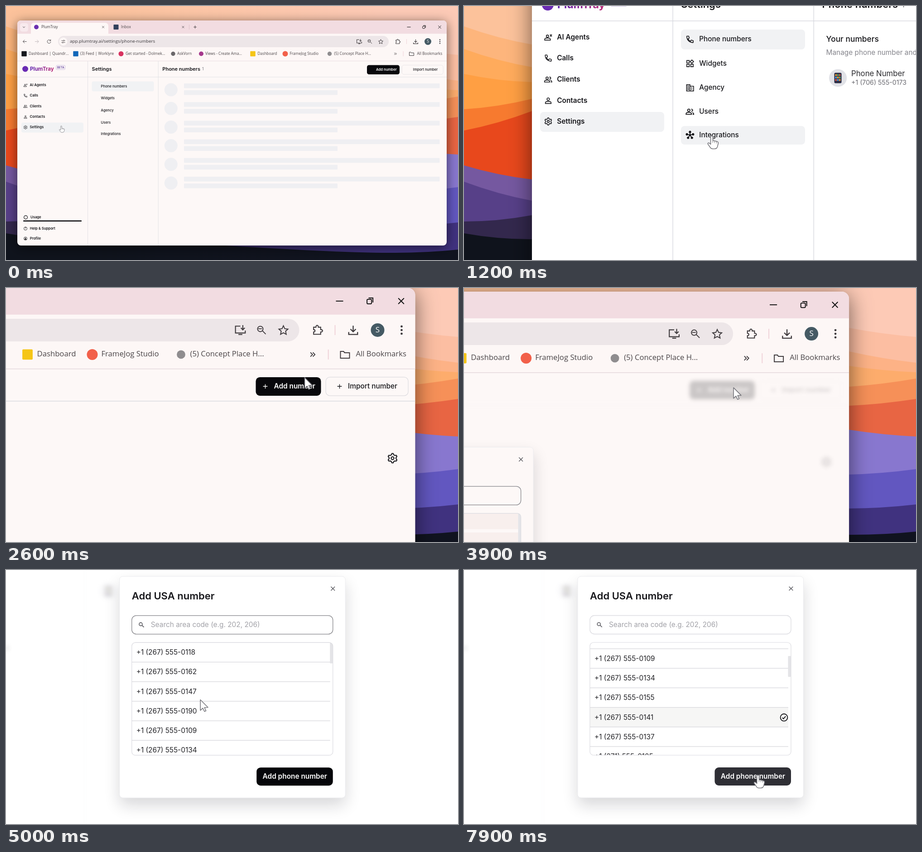
An HTML page with a canvas for the animation above (8000 ms loop, 998 px wide and 561 px high).

```html
<!DOCTYPE html>
<html lang="en">
<head>
<meta charset="utf-8">
<title>Phone number setup</title>
<style>
html, body { margin: 0; width: 100%; height: 100%; overflow: hidden; background: #10131f; }
canvas { display: block; width: 100vw; height: 100vh; }
</style>
</head>
<body>
<canvas id="stage" width="998" height="561"></canvas>
<script>
const W = 998, H = 561, LOOP = 8000;
const stage = document.getElementById('stage').getContext('2d');
const layer = document.createElement('canvas');
layer.width = W; layer.height = H;
const pageCtx = layer.getContext('2d');
let c = stage;

const UI = 'Inter, sans-serif', CHROME = '"Open Sans", sans-serif';
const INK = '#17171b', LINE = '#d8d9df';
const clamp = v => Math.max(0, Math.min(1, v));
const lerp = (a, b, k) => a + (b - a) * k;
const ramp = (t, a, b) => clamp((t - a) / (b - a));
const smooth = u => u * u * (3 - 2 * u);
const quart = u => u < .5 ? 8 * u ** 4 : 1 - 8 * (1 - u) ** 4;

// --- drawing helpers ---
function text(s, x, y, size, color = INK, weight = 400, font = UI, align = 'left') {
  c.font = `${weight} ${size}px ${font}`;
  c.textAlign = align;
  c.textBaseline = 'middle';
  c.fillStyle = color;
  c.fillText(s, x, y);
}
function box(x, y, w, h, r, fill, stroke, lw = .5) {
  c.beginPath();
  c.roundRect(x, y, w, h, r);
  if (fill) { c.fillStyle = fill; c.fill(); }
  if (stroke) { c.strokeStyle = stroke; c.lineWidth = lw; c.stroke(); }
}
function dot(x, y, r, fill) {
  c.beginPath();
  c.arc(x, y, r, 0, 7);
  c.fillStyle = fill;
  c.fill();
}
function icon(d, x, y, size, color = INK, lw = 2, fill = false) {
  c.save();
  c.translate(x - size / 2, y - size / 2);
  c.scale(size / 24, size / 24);
  c.lineWidth = lw;
  c.strokeStyle = c.fillStyle = color;
  const p = new Path2D(d);
  if (fill) c.fill(p);
  c.stroke(p);
  c.restore();
}
const rule = (x, y, w, h, color) => { c.fillStyle = color; c.fillRect(x, y, w, h); };

function gearPath() {
  let d = '';
  for (let i = 0; i < 24; i++) {
    const r = i % 4 < 2 ? 10 : 7.4, a = (i - .5) * Math.PI / 12;
    d += (i ? 'L' : 'M') + (12 + r * Math.sin(a)) + ' ' + (12 - r * Math.cos(a));
  }
  return d + 'ZM15 12a3 3 0 1 1-6 0a3 3 0 1 1 6 0';
}
const I = {
  person: 'M15.500 8a3.500 3.500 0 1 1-7 0a3.500 3.500 0 1 1 7 0M4 20v-2q0-4 8-4t8 4v2z',
  agent: 'M13 9a3.200 3.200 0 1 1-6.400 0a3.200 3.200 0 1 1 6.400 0M2 20v-2q0-4 8-4t8 4v2zM17 4l5 6M22 4l-5 6',
  people: 'M12 8a3.200 3.200 0 1 1-6.400 0a3.200 3.200 0 1 1 6.400 0M1.500 19v-1.500q0-4 7.300-4t7.300 4V19zM15 5q4 0 4 3t-4 3M18 14q4 1 4 5h-3',
  phone: 'M4 3.500h4.500l1.500 5-3 2.500q2 4 6 6l2.500-3 5 1.500V20q0 .7-.7.7Q4 19 3.500 4z',
  gear: gearPath(),
  widgets: 'M3.500 4h6.500v6.500H3.500zM3.500 14h6.500v6.500H3.500zM14 14h6.500v6.500H14zM17 2.500l4.500 4.500-4.500 4.500-4.500-4.500z',
  building: 'M3 4h9v16.500H3zM12 8h9.500v12.500H12M5 8h5M5 12h5M5 16h5M15 12h3M15 16h3',
  hub: 'M12 12V4M12 12l8-2M12 12l5 7M12 12l-5 7M12 12l-8-2',
  ring: 'M20.500 12a8.500 8.500 0 1 1-17 0a8.500 8.500 0 1 1 17 0',
  plus: 'M12 3v18M3 12h18',
  close: 'M4 4l16 16M20 4L4 20',
  search: 'M15 9.500a6 6 0 1 1-12 0a6 6 0 1 1 12 0M14 14l7 7',
  star: 'M12 2.500l3 6.500 7 .8-5.200 4.700 1.500 7L12 18l-6.300 3.500 1.500-7L2 9.800l7-.8z',
  down: 'M12 3v12M6.500 10l5.500 5.500 5.500-5.500M3 16v5h18v-5',
  install: 'M12 4H2v14h20v-5M8 21h8M17 2v9M13 7.500l4 4 4-4',
  puzzle: 'M4 6h5q0-4 2.500-4T14 6h5v5q4 0 4 2.500T19 16v5H4v-5q3 0 3-2.500T4 11z',
  folder: 'M2 5h7l2 3h11v12H2z',
  back: 'M21 12H4M11 4l-8 8 8 8',
  fwd: 'M3 12h17M13 4l8 8-8 8',
  reload: 'M19.500 8A8.500 8.500 0 1 0 20.500 13M20 2v6.500h-6.500',
  chevron: 'M5 9l7 7 7-7',
  more: 'M4 5l7 7-7 7M12 5l7 7-7 7',
  sliders: 'M2 7h9M19 7h3M18 7a3 3 0 1 1-6 0a3 3 0 1 1 6 0M2 17h3M13 17h9M12 17a3 3 0 1 1-6 0a3 3 0 1 1 6 0',
  check: 'M21.500 12a9.500 9.500 0 1 1-19 0a9.500 9.500 0 1 1 19 0M7.500 12.500l3 3 6-6.500'
};

// --- wallpaper: left colour, right colour, edge heights at x = 0, 150, 850, 998 ---
const BANDS = [
  ['#fcc29b', '#fdcab6', -20, -20, -20, -20],
  ['#fdb57c', '#fcbea2', 45, 85, 88, 108],
  ['#ffab5c', '#fdb286', 95, 135, 140, 165],
  ['#ff9f43', '#fdac6c', 150, 168, 172, 186],
  ['#f77a2f', '#f69058', 228, 205, 218, 200],
  ['#e8481c', '#e86543', 275, 232, 260, 245],
  ['#7558a0', '#8877cf', 352, 383, 313, 328],
  ['#574088', '#6257c0', 388, 430, 412, 400],
  ['#33284d', '#40327f', 476, 462, 487, 478],
  ['#0f131c', '#10131f', 502, 515, 545, 538]
];
function wallpaper() {
  for (const [l, r, a, b, d, e] of BANDS) {
    const g = c.createLinearGradient(150, 0, 850, 0);
    g.addColorStop(0, l);
    g.addColorStop(1, r);
    c.fillStyle = g;
    c.beginPath();
    c.moveTo(0, a);
    c.quadraticCurveTo(75, (a + b) / 2 + 7, 150, b);
    c.bezierCurveTo(350, b, 650, d, 850, d);
    c.quadraticCurveTo(924, (d + e) / 2 + 4, W, e);
    c.lineTo(W, H);
    c.lineTo(0, H);
    c.fill();
  }
}

// --- browser frame ---
function bookmark(x, color, label, tx, round) {
  if (round) dot(x, 105.5, round, color);
  else box(x - 5.7, 99.8, 11.4, 11.4, 1, color);
  text(label, tx, 105.5, 8.35, '#4a4548', 400, CHROME);
}
function browser() {
  const tool = '#fdf7f6', ico = '#403c3f';
  rule(25, 32, 948, 29.5, '#f2dce1');
  rule(25, 61.5, 948, 60, tool);
  box(31, 38, 18, 18.5, 5, '#f8eaed');
  icon(I.chevron, 39.5, 46.5, 8, ico, 3);
  box(55, 37, 171, 26, [7, 7, 0, 0], tool);
  dot(67, 46.5, 5, '#6a2fb0');
  text('PlumTray', 78, 47, 8.4, '#39363a', 400, CHROME);
  icon(I.close, 214.5, 46.5, 7, ico, 2.800);
  box(237.5, 41, 11, 11, 1, '#31405c');
  text('Inbox', 254, 47, 8.4, '#4a4548', 400, CHROME);
  icon(I.close, 391, 46.5, 7, ico, 2.800);
  rule(404, 41, .8, 11, '#d9bcc4');
  icon(I.plus, 417.5, 46.5, 9, ico, 2.500);
  rule(885.5, 46, 8, 1, '#151515');
  box(919.8, 44.6, 5, 5, 1, null, '#151515', 1);
  c.beginPath();
  c.moveTo(921.5, 43);
  c.lineTo(926.3, 43);
  c.lineTo(926.3, 48);
  c.stroke();
  icon(I.close, 957.5, 46.5, 9.5, '#151515', 2.500);

  icon(I.back, 41.5, 78.5, 11, ico);
  icon(I.fwd, 68, 78.5, 11, '#b9b2b5');
  icon(I.reload, 95, 78.5, 11, ico);
  box(115, 66, 730, 25, 12.5, '#ede6e8');
  dot(126.5, 78.5, 9, tool);
  icon(I.sliders, 126.5, 78.5, 10, ico);
  text('app.plumtray.ai/settings/phone-numbers', 141, 78.5, 9.8, '#39363a', 400, CHROME);
  icon(I.install, 780, 78.5, 13, ico);
  icon(I.search, 803.5, 78.5, 12, ico);
  rule(799.8, 76.6, 4, .9, ico);
  icon(I.star, 827.5, 78.5, 12, ico);
  icon(I.puzzle, 865, 78.5, 12.5, ico);
  rule(884, 73, 1, 11, '#f0d3d9');
  icon(I.down, 904.5, 78.5, 13, ico, 2.200);
  dot(931.5, 78.5, 7.5, '#455a64');
  text('S', 931.5, 78.7, 8.5, '#fff', 400, CHROME, 'center');
  for (const d of [-4, 0, 4]) dot(958, 78.5 + d, 1.2, ico);

  bookmark(40, '#16181d', 'Dashboard | Quandr...', 50);
  bookmark(154, '#1267b8', '(3) Feed | Worklyre', 164);
  bookmark(254, '#d8325f', 'Get started - Dolmek...', 264, 5.5);
  bookmark(369, '#6b686b', 'AskVorn', 378, 4.7);
  bookmark(431, '#a5388c', 'Views - Create Ama...', 440, 5);
  bookmark(545, '#f5c516', 'Dashboard', 555.5);
  bookmark(616.5, '#f2604a', 'FrameJog Studio', 626.5, 6);
  bookmark(714.5, '#8f8d8f', '(5) Concept Place H...', 724.5, 4.7);
  icon(I.more, 860, 105.5, 8, ico, 2.800);
  rule(876.6, 100, 1, 11, '#f0d3d9');
  icon(I.folder, 895.5, 105.5, 12, ico);
  text('All Bookmarks', 907.5, 105.5, 8.35, '#4a4548', 400, CHROME);
  rule(25, 121, 948, .8, '#e6dade');
}

// --- app page ---
const NAV = [['agent', 'AI Agents', 175], ['phone', 'Calls', 198], ['people', 'Clients', 221.7],
  ['person', 'Contacts', 245], ['gear', 'Settings', 268]];
const SUB = [['phone', 'Phone numbers', 177.3], ['widgets', 'Widgets', 204], ['building', 'Agency', 230.8],
  ['people', 'Users', 257.3], ['hub', 'Integrations', 283]];

function page(t, cur) {
  const loaded = t >= 300, grey = '#f1f2f4';
  rule(25, 156.6, 948, .7, LINE);
  rule(180.2, 121, .7, 408, LINE);
  rule(335.8, 121, .7, 408, LINE);

  dot(42.5, 139, 6.5, '#6a2bb3');
  const g = c.createLinearGradient(53, 0, 108, 0);
  g.addColorStop(0, '#5b21b0');
  g.addColorStop(1, '#c02a74');
  text('PlumTray', 53, 139.3, 11.6, g, 700);
  box(111, 131, 19.5, 9.5, 2, null, '#b9a9d8', .7);
  text('BETA', 120.8, 136, 6, '#5b3b9c', 600, UI, 'center');

  box(34, 257.5, 137, 22, 4, grey);
  for (const [i, s, y] of NAV) {
    icon(I[i], 43, y, 9.5);
    text(s, 52.6, y, 7.7, INK, 600);
  }
  icon(I.ring, 43.5, 466.7, 11, INK, 2.500);
  text('Usage', 54, 466.7, 7.7, INK, 600);
  box(38, 473.5, 129, 2.4, 1, '#0c0c10');
  icon(I.ring, 43, 491.6, 10);
  text('?', 43, 491.7, 6, INK, 600, UI, 'center');
  text('Help & Support', 52.8, 491.6, 7.7, INK, 600);
  icon(I.ring, 43, 513.6, 10);
  icon(I.person, 43, 513.8, 6, INK, 3, true);
  text('Profile', 52.8, 513.6, 7.7, INK, 600);

  text('Settings', 189.6, 139.3, 11, INK, 600);
  box(189.5, 166.5, 137, 22, 4, grey);
  if (cur.x > 189 && cur.x < 327 && cur.y > 273 && cur.y < 294) box(189.5, 273, 137, 20.5, 4, grey);
  for (const [i, s, y] of SUB) {
    if (loaded) icon(I[i], 199.5, y, 10);
    text(s, 209.6, y, 7.7, INK, 500);
  }
  if (loaded) for (const [x, y] of [[0, 0], [0, -3.4], [3.4, -.8], [2.1, 3], [-2.1, 3], [-3.4, -.8]])
    dot(199.5 + x, 283 + y, 1.3, INK);

  text('Phone numbers', 345.3, 139.3, 11, INK, 600);
  text('1', 433, 139.3, 8.4, '#6d6d74');
  box(797, 130.5, 72, 20.5, 4.5, '#08080c');
  text('Add number', 817, 140.7, 7.7, '#fff', 600);
  box(874.3, 130.5, 91, 20.5, 4.5, null, '#dddce0', .6);
  text('Import number', 898.8, 140.7, 7.7, INK, 500);

  if (!loaded) {
    for (let i = 0; i < 6; i++) {
      const y = 171 + i * 41.2;
      dot(364.3, y + 14, 14.5, '#efeff2');
      box(393, y, 564.5, 10.5, 1, '#efeff2');
      box(393, y + 15, 339, 10.5, 1, '#efeff2');
    }
    return;
  }
  icon(I.plus, 807.5, 140.7, 6.5, '#fff', 2.500);
  icon(I.plus, 889.5, 140.7, 6.5, INK, 2.500);
  icon(I.gear, 948, 220, 12.5);
  text('Your numbers', 349.8, 177.5, 8.7, INK, 500);
  text('Manage phone number and calls', 349.8, 192.2, 7.7, '#85858c');
  dot(362.8, 220, 9.8, '#e1e2e7');
  box(358.8, 214.3, 8, 11.4, 1.3, '#2b2c45');
  for (let i = 0; i < 9; i++)
    rule(359.8 + i % 3 * 2.1, 215.8 + (i / 3 | 0) * 2.7, 1.7, 2, ['#f29b38', '#4c9fe0', '#e0594c', '#58b56b'][i * 3 % 4]);
  text('Phone Number', 377.5, 215.6, 8.4, '#2a2a2e');
  text('+1 (706) 555-0173', 377.5, 225.2, 7.1, '#68686f');
}

// --- dialog, laid out at double size ---
const ENDS = ['0118', '0162', '0147', '0190', '0109', '0134', '0155', '0141', '0137', '0105', '0126'];
const ROW = 43.2;

function dialog(t, show) {
  c.save();
  c.globalAlpha = show;
  c.translate(249.75, 196.75);
  c.scale(.5, .5);
  c.save();
  c.shadowColor = 'rgba(20,20,30,.17)';
  c.shadowBlur = 34;
  c.shadowOffsetY = 16;
  box(251, 14, 498.5, 489, 7, t < 4150 ? '#fdf8f7' : '#fff');
  c.restore();
  box(251, 14, 498.5, 489, 7, null, '#ececef', 1);
  text('Add USA number', 278, 58, 22, INK, 600);
  icon(I.close, 722, 41, 13, '#55555b', 2.500);

  box(278, 100.5, 444, 41, 10, null, t < 6450 ? '#85858a' : '#dcdce1', 1.3);
  icon(I.search, 299.5, 121, 14, '#5c5c62', 2.800);
  text('Search area code (e.g. 202, 206)', 320, 121, 15.4, '#a2a2a8');
  if (t > 5380 && t < 5880) rule(320, 111, 1.2, 20, INK);

  c.save();
  c.beginPath();
  c.roundRect(278, 160, 444, 249, 8);
  c.clip();
  if (t < 5000) {
    for (let i = 0; i < 6; i++) rule(278, 160 + i * 42.5, 438, 35, t < 4150 ? '#f8efed' : '#f6f6f8');
    rule(716, 160, 6, 249, '#e4e4e8');
  } else {
    const scroll = 159 * smooth(ramp(t, 5230, 5600));
    ENDS.forEach((n, i) => {
      const y = 160 + i * ROW - scroll;
      if (i === 7 && t > 5550) rule(278, y, 438, ROW, '#f6f6f5');
      text(`+1 (${i === 9 ? 271 : 267}) 555-${n}`, 288, y + 22.5, 15.4, '#222226');
      rule(278, y - .5, 438, 1.2, '#d5d5da');
      if (i === 7 && t >= 6650) icon(I.check, 706.5, y + 22.3, 20, INK, 2.200);
    });
    box(715.5, 160 + scroll * .189, 6.5, 46, 1, '#e4e4e7');
  }
  c.restore();
  box(278, 160, 444, 249, 8, null, '#dcdce1', 1.2);

  box(553.5, 436, 168.5, 40, 9, t > 7450 ? '#2f2f35' : '#05060a');
  text('Add phone number', 638, 456.3, 15.4, '#fff', 600, UI, 'center');
  c.restore();
}

// --- cursor ---
const PATH = [[600, 122, 265], [1150, 223, 283.5], [1250, 224, 284.5], [1500, 400, 360], [2450, 851, 131],
  [2650, 851, 131], [2950, 845.5, 138], [3900, 845.5, 138], [4400, 613.5, 214.5], [5050, 462, 342],
  [5250, 462, 342], [5550, 443, 358], [6120, 443, 358], [6200, 440.3, 355.8], [7030, 440.3, 355.8], [7600, 574.3, 423.3]];
const ARROW = new Path2D('M0 0V11.800L2.700 9.300 4.500 13 6.200 12.200 4.500 8.600 8.400 8.500Z');
const HAND = new Path2D('M-1.200 1Q-1.200-.2 0-.2T1.200 1V5L5.500 6Q7.300 6.400 7.200 8L6.500 11Q6 14.200 3 14.200H1Q-1 14.200-2 12.200L-4.300 8.900Q-4.600 7.500-3.200 7.600L-1.200 9.200Z');

function cursorAt(t) {
  let p = PATH[0];
  for (const q of PATH) {
    if (t < q[0]) {
      const k = smooth(ramp(t, p[0], q[0]));
      return { x: lerp(p[1], q[1], k), y: lerp(p[2], q[2], k) };
    }
    p = q;
  }
  return { x: p[1], y: p[2] };
}
function cursor(t, p) {
  const shape = t < 1300 || t > 5300 ? HAND : ARROW;
  c.save();
  c.translate(p.x, p.y);
  c.lineJoin = 'round';
  c.lineWidth = .8;
  c.strokeStyle = '#77777d';
  c.fillStyle = '#fff';
  c.fill(shape);
  c.stroke(shape);
  if (shape === HAND) {
    c.lineWidth = .5;
    c.stroke(new Path2D('M1.200 5V7.500M3.200 5.600V7.800M5.200 6V8.200'));
  }
  c.restore();
}

// --- camera: scale, x, y ---
const FULL = [1, 0, 0], MENU = [2, 100, -281], ADD = [2, -1101, -53], FORM = [2, -499.5, -393.5];
const MOVES = [[0, 550, FULL, MENU], [1520, 3020, MENU, ADD], [3630, 5130, ADD, FORM]];
function camera(t) {
  const [a, b, from, to] = MOVES.filter(m => t >= m[0]).pop();
  const k = quart(ramp(t, a, b));
  return from.map((v, i) => lerp(v, to[i], k));
}

function draw(t) {
  const [s, ox, oy] = camera(t), cur = cursorAt(t), show = ramp(t, 3640, 3820);
  const view = () => c.setTransform(s, 0, 0, s, ox, oy);

  c = pageCtx;
  c.setTransform(1, 0, 0, 1, 0, 0);
  c.clearRect(0, 0, W, H);
  view();
  page(t, cur);

  c = stage;
  c.setTransform(1, 0, 0, 1, 0, 0);
  wallpaper();
  view();
  c.save();
  c.shadowColor = 'rgba(0,0,0,.55)';
  c.shadowBlur = 24 * s;
  c.shadowOffsetY = 4 * s;
  box(25, 32, 948, 497, 8, 121 * s + oy > 20 ? '#fdf8f7' : '#fff');
  c.restore();

  c.save();
  c.beginPath();
  c.roundRect(25, 32, 948, 497, 8);
  c.clip();
  c.save();
  c.setTransform(1, 0, 0, 1, 0, 0);
  if (show) c.filter = `blur(${4 * show}px)`;
  c.globalAlpha = 1 - .8 * show;
  c.drawImage(layer, 0, 0);
  c.restore();
  browser();
  if (show) dialog(t, show);
  c.restore();
  cursor(t, cur);
}

function tick(now) {
  draw(now % LOOP);
  requestAnimationFrame(tick);
}
requestAnimationFrame(tick);
</script>
</body>
</html>
```
